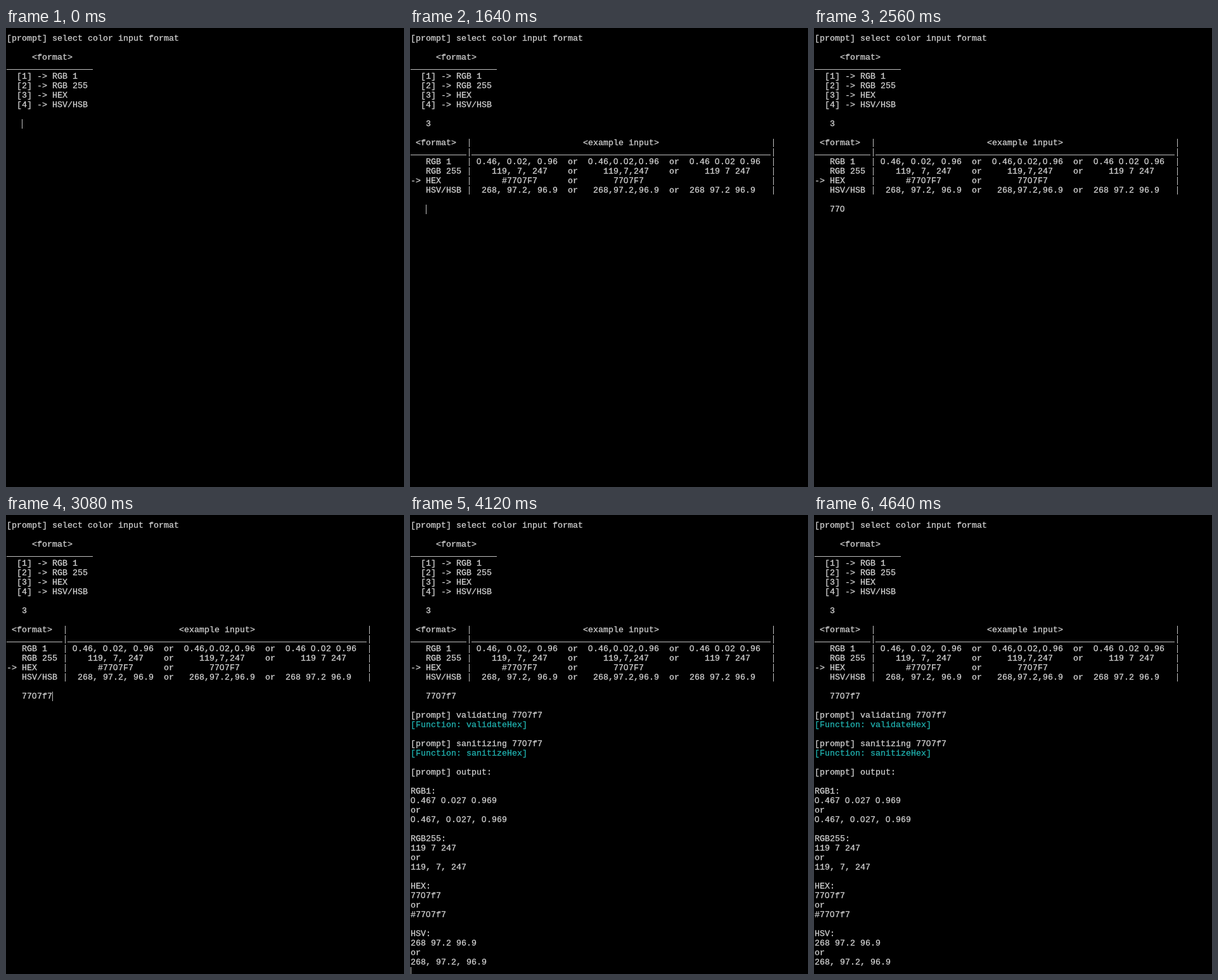
These frames come from a looping animation (628 px wide and 725 px high, 7200 ms). An HTML page:

```html
<!DOCTYPE html>
<html lang="en">
<head>
<meta charset="utf-8">
<title>Color converter console</title>
<style>
  html, body { margin: 0; width: 100%; height: 100%; overflow: hidden; background: #000; }
  svg { display: block; width: 628px; height: 725px; }
  rect { fill: #bfbfbf; shape-rendering: crispEdges; }
  text {
    font: 13.33px "Liberation Mono", monospace;
    fill: #d0d0d0; stroke: #d0d0d0; stroke-width: 0.3px;
  }
  .zero { font-family: "Liberation Sans", sans-serif; }
  .cyan { fill: #20b2b0; stroke: #20b2b0; }
</style>
</head>
<body>
<svg id="screen" viewBox="0 0 628 725"></svg>
<script>
const LOOP = 7200, CELL = 8, LINE = 15;
const screen = document.getElementById('screen');
const colX = c => 1 + c * CELL;
const rowY = r => 9 + r * LINE;

function add(parent, tag, attrs, content = '') {
  const el = document.createElementNS('http://www.w3.org/2000/svg', tag);
  for (const k in attrs) el.setAttribute(k, attrs[k]);
  el.textContent = content;
  return parent.appendChild(el);
}

const bar = (parent, x, y, width, height) => add(parent, 'rect', { x, y, width, height });

// One phrase on the character grid; zeros are drawn without a dot.
function phrase(parent, row, col, str) {
  const x = [...str].map((_, i) => colX(col + i)).join(' ');
  const el = add(parent, 'text', { x, y: rowY(row) + 11 });
  if (str.startsWith('[Function')) el.setAttribute('class', 'cyan');
  for (const part of str.split(/(0)/)) {
    if (part) add(el, 'tspan', part === '0' ? { class: 'zero' } : {}, part);
  }
}

const blocks = [];

// Prints lines from a given row, visible from a given time.
function print(start, row, lines, indent = 0) {
  const g = add(screen, 'g', {});
  lines.forEach((line, i) => {
    for (const m of line.matchAll(/_+|\||[^\s_|]+(?: [^\s_|]+)*/g)) {
      const str = m[0], r = row + i, col = indent + m.index;
      if (str === '|') bar(g, colX(col) + 4, rowY(r) + 1, 1, 13);
      else if (str[0] === '_') bar(g, colX(col), rowY(r) + 11, str.length * CELL, 1);
      else phrase(g, r, col, str);
    }
  });
  blocks.push({ g, start });
}

print(0, 0, [
  '[prompt] select color input format',
  '',
  '     <format>',
  '_'.repeat(17),
  '  [1] -> RGB 1',
  '  [2] -> RGB 255',
  '  [3] -> HEX',
  '  [4] -> HSV/HSB'
]);

print(720, 9, ['3'], 3);

print(1560, 11, [
  ' <format>  |                      <example input>                      |',
  '_'.repeat(11) + '|' + '_'.repeat(59) + '|',
  '   RGB 1   | 0.46, 0.02, 0.96  or  0.46,0.02,0.96  or  0.46 0.02 0.96  |',
  '   RGB 255 |    119, 7, 247    or     119,7,247    or     119 7 247    |',
  '-> HEX     |      #7707F7      or       7707F7                         |',
  '   HSV/HSB |  268, 97.2, 96.9  or   268,97.2,96.9  or  268 97.2 96.9   |'
]);

[2120, 2480, 2560, 2720, 2960, 3080].forEach((t, i) => print(t, 18, ['7707f7'[i]], 3 + i));

const result = (name, a, b) => ['', name + ':', a, 'or', b];
print(4120, 20, [
  '[prompt] validating 7707f7',
  '[Function: validateHex]',
  '',
  '[prompt] sanitizing 7707f7',
  '[Function: sanitizeHex]',
  '',
  '[prompt] output:',
  ...result('RGB1', '0.467 0.027 0.969', '0.467, 0.027, 0.969'),
  ...result('RGB255', '119 7 247', '119, 7, 247'),
  ...result('HEX', '7707f7', '#7707f7'),
  ...result('HSV', '268 97.2 96.9', '268, 97.2, 96.9')
]);

// Caret states: time, row, column; no position means hidden.
const caretSteps = [
  [0, 9, 3], [280], [840, 9, 4], [1360],
  [1560, 18, 3], [2120, 18, 4], [2400],
  [2960, 18, 8], [3080, 18, 9], [3560],
  [4000, 18, 9], [4120, 47, 0], [4560]
];
const caret = bar(screen, 0, 0, 1, LINE);

function show(el, on) {
  el.setAttribute('visibility', on ? 'visible' : 'hidden');
}

function render(t) {
  for (const { g, start } of blocks) show(g, t >= start);
  const [, row, col] = caretSteps.filter(s => s[0] <= t).pop();
  show(caret, row !== undefined);
  if (row !== undefined) {
    caret.setAttribute('x', colX(col));
    caret.setAttribute('y', rowY(row));
  }
}

const begin = performance.now();
function tick() {
  render((performance.now() - begin) % LOOP);
  requestAnimationFrame(tick);
}
tick();
</script>
</body>
</html>
```
